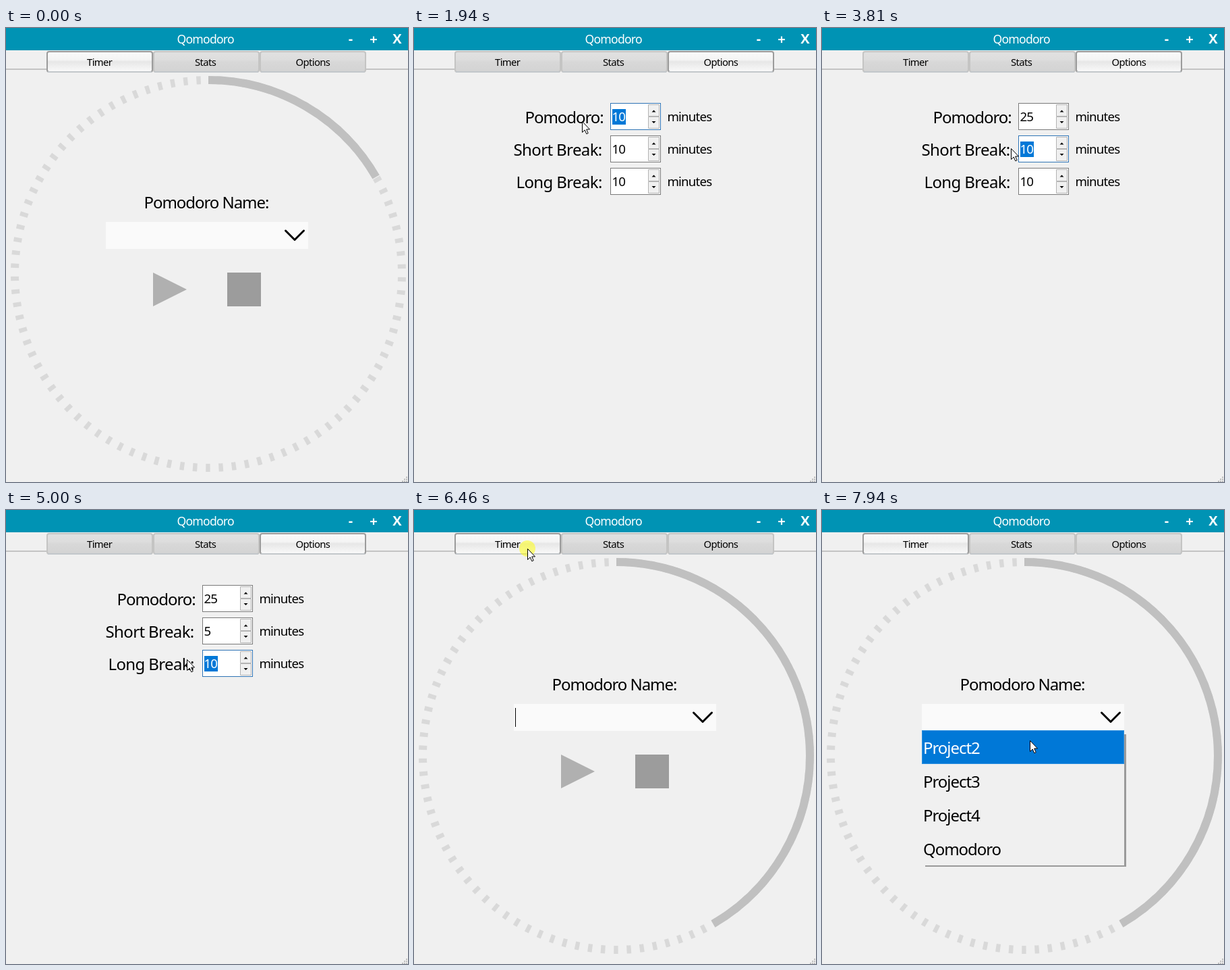
Write an HTML page that moves like this. It is 596 px wide and 672 px high and loops after 7.99 s.

```html
<!DOCTYPE html>
<html lang="en">
<head>
<meta charset="utf-8">
<title>Qomodoro</title>
<style>
  html, body { margin: 0; width: 100%; height: 100%; overflow: hidden; background: #f0f0f0; }
  svg { display: block; width: 596px; height: 672px; }
  text { font: 24px "Noto Sans", "Open Sans", sans-serif; letter-spacing: -.044em; white-space: pre; }
  .title { font-size: 17.6px; fill: #fff; }
  .button { font-size: 20px; font-weight: 700; fill: #fff; text-anchor: middle; letter-spacing: 0; }
  .tab text { font-size: 14.8px; letter-spacing: -.04em; }
  .tab rect { fill: url(#idle); stroke: #c4c4c3; stroke-width: 2; }
  .tab.hover rect, .tab.on rect { fill: url(#lit); }
  .tab.on rect { stroke: #9b9b9b; }
  .tab path { stroke: #c2c7cb; stroke-width: 2; }
  .loose { letter-spacing: -.026em; }
  .small { font-size: 18.67px; }
  .ring { fill: none; stroke-width: 12; }
  .focus { fill: none; stroke: #2f74b5; }
  .caret { fill: #000; }
</style>
</head>
<body>
<svg viewBox="0 0 596 672">
  <defs>
    <linearGradient id="idle" x2="0" y2="1">
      <stop stop-color="#e1e1e1"/><stop offset=".4" stop-color="#ddd"/>
      <stop offset=".5" stop-color="#d8d8d8"/><stop offset="1" stop-color="#d3d3d3"/>
    </linearGradient>
    <linearGradient id="lit" x2="0" y2="1">
      <stop stop-color="#fafafa"/><stop offset=".4" stop-color="#f4f4f4"/>
      <stop offset=".5" stop-color="#e7e7e7"/><stop offset="1" stop-color="#fafafa"/>
    </linearGradient>
    <g id="spin">
      <rect x=".5" y=".5" width="74" height="39" fill="#fff" stroke="#7a7a7a"/>
      <path d="M56.5 2.5h16v17h-16zM56.5 20.5h16v17h-16z" fill="#f0f0f0" stroke="#b4b4b4"/>
      <path d="M61.5 13.5l3-3 3 3zM61.5 27l3 3 3-3z"/>
    </g>
  </defs>

  <rect width="596" height="672" fill="#f0f0f0"/>
  <rect width="596" height="33" fill="#0093b4"/>
  <text class="title" x="253.5" y="23">Qomodoro</text>
  <text class="button" x="511" y="23">-</text>
  <text class="button" x="545" y="24">+</text>
  <text class="button" x="580" y="23">X</text>

  <path d="M0 61H60M534 61H596" stroke="#c4c4c4" stroke-width="2"/>
  <g class="tab" id="timerTab">
    <rect x="61" y="35" width="156" height="30" rx="3"/><path d="M62 65H216"/>
    <text x="120" y="56">Timer</text>
  </g>
  <g class="tab">
    <rect x="219" y="35" width="156" height="30" rx="3"/><path d="M220 65H374"/>
    <text x="280" y="56">Stats</text>
  </g>
  <g class="tab" id="optionsTab">
    <rect x="377" y="35" width="156" height="30" rx="3"/><path d="M378 65H532"/>
    <text x="429.5" y="56">Options</text>
  </g>

  <g id="timerPage">
    <g transform="translate(300 364) rotate(-90)">
      <circle class="ring" r="287" stroke="#d9d9d9" stroke-dasharray="6.4 12.864" stroke-dashoffset="-12.5"/>
      <circle class="ring" id="arc" r="287" stroke="#c0c0c0" pathLength="360"/>
    </g>
    <text x="204.5" y="267">Pomodoro Name:</text>
    <rect x="148" y="287" width="300" height="40" fill="#fafafa"/>
    <path d="M414.5 300L428 313.5 441.5 300" fill="none" stroke="#000" stroke-width="3" stroke-linecap="round" stroke-linejoin="round"/>
    <path d="M218 362l50 25-50 25z" fill="#b0b0b0"/>
    <rect x="328" y="362" width="50" height="50" fill="#9c9c9c"/>
    <rect class="caret" id="nameCaret" x="150" y="293" width="1" height="28"/>
    <g id="menu">
      <path d="M448 332h3v196H153v-2h295z" fill="#9a9a9a"/>
      <rect x="148" y="326" width="300" height="200" fill="#f0f0f0"/>
      <rect x="148" y="326" width="300" height="50" fill="#0078d7"/>
      <rect x="148.5" y="326.5" width="299" height="49" fill="none" stroke="#58a8e8" stroke-dasharray="1 1"/>
      <text x="150" y="361" fill="#fff">Project2</text>
      <text x="150" y="411">Project3</text>
      <text x="150" y="461">Project4</text>
      <text x="150" y="511">Qomodoro</text>
    </g>
  </g>

  <g id="optionsPage">
    <text x="164.5" y="141">Pomodoro:</text>
    <text class="loose" x="147.5" y="189">Short Break:</text>
    <text class="loose" x="151.5" y="237">Long Break:</text>
    <g id="rows"></g>
    <rect class="caret" id="longCaret" x="294" y="216" width="1" height="23"/>
  </g>

  <path d="M593 664h2v2h-2zM590 667h2v2h-2zM593 667h2v2h-2zM587 670h2v2h-2zM590 670h2v2h-2zM593 670h2v2h-2z" fill="#bdbdbd"/>

  <g id="pointer">
    <circle id="press" r="12" fill="#ff0" opacity=".5"/>
    <path d="M.5.5V16.5L4.2 13 6.8 18.8 9.2 17.7 6.7 12H11.5z" fill="#fff" stroke="#000"/>
  </g>
</svg>

<script>
const LOOP = 7990;
const $ = id => document.getElementById(id);
const within = (t, ...spans) => spans.some(([a, b]) => t >= a && t < b);
const show = (el, on) => el.setAttribute('visibility', on ? 'inherit' : 'hidden');

// Each row: focus spans, selection spans, and [time, text] values
const fields = [
  { focus: [[1640, 3330]], select: [[1520, 2300]], values: [[0, '10'], [2300, '2'], [2490, '25']] },
  { focus: [[3330, 4500]], select: [[3450, 4040]], values: [[0, '10'], [4040, '5']] },
  { focus: [[0, 1640], [4500, LOOP]], select: [[4620, 5150]], values: [[0, '10'], [5150, '1'], [5410, '15']] }
];

$('rows').innerHTML = fields.map((f, i) => `
  <g transform="translate(291 ${111 + 48 * i})">
    <use href="#spin"/>
    <rect class="focus" x=".5" y=".5" width="74" height="39"/>
    <rect class="mark" x="3" y="9" width="20" height="23" fill="#0078d7"/>
    <text class="small value" x="2.5" y="27">10</text>
    <text class="small" x="84.5" y="27">minutes</text>
  </g>`).join('');
fields.forEach((f, i) => {
  const row = $('rows').children[i];
  for (const name of ['focus', 'mark', 'value']) f[name + 'El'] = row.querySelector('.' + name);
});

// Pointer stops: time, x, y
const path = [
  [30, 557, 645], [550, 460, 56], [890, 460, 56], [1400, 316, 133],
  [1480, 316, 133], [1650, 278, 135], [1850, 251, 138], [1940, 249, 138],
  [2490, 249, 138], [3240, 316, 183], [3350, 316, 183], [3720, 280, 178],
  [4100, 280, 178], [4430, 314, 224], [4500, 314, 224], [4800, 268, 221],
  [5940, 268, 221], [6230, 168, 57], [6560, 168, 57], [7230, 432.5, 325.5],
  [7510, 432.5, 325.5], [7940, 308, 341]
];
const presses = [[690, 740], [1480, 1870], [3330, 3760], [4500, 4860], [6460, 6510], [7280, 7360]];

function pointerAt(t) {
  const i = path.findIndex(p => p[0] > t);
  if (i < 1) return (i ? path[path.length - 1] : path[0]).slice(1);
  const [t0, x0, y0] = path[i - 1], [t1, x1, y1] = path[i];
  const u = (t - t0) / (t1 - t0), e = u * u * (3 - 2 * u);
  return [x0 + (x1 - x0) * e, y0 + (y1 - y0) * e];
}

function draw(t) {
  const options = within(t, [690, 6460]);
  show($('optionsPage'), options);
  show($('timerPage'), !options);
  $('timerTab').classList.toggle('on', !options);
  $('optionsTab').classList.toggle('on', options);
  $('optionsTab').classList.toggle('hover', within(t, [480, 690]));
  $('timerTab').classList.toggle('hover', within(t, [6190, 6460]));

  $('arc').setAttribute('stroke-dasharray', `${t < 690 ? 60 : 150} 360`);
  show($('nameCaret'), within(t, [6460, 6990]));
  show($('menu'), !options && t >= 7510);
  show($('longCaret'), within(t, [690, 1220]));

  for (const f of fields) {
    const selected = within(t, ...f.select);
    show(f.focusEl, within(t, ...f.focus));
    show(f.markEl, selected);
    f.valueEl.setAttribute('fill', selected ? '#fff' : '#000');
    f.valueEl.textContent = f.values.filter(v => v[0] <= t).pop()[1];
  }

  const [x, y] = pointerAt(t);
  $('pointer').setAttribute('transform', `translate(${x} ${y})`);
  show($('pointer'), t >= 30);
  show($('press'), within(t, ...presses));
}

const start = performance.now();
function tick() {
  draw((performance.now() - start) % LOOP);
  requestAnimationFrame(tick);
}
tick();
</script>
</body>
</html>
```
